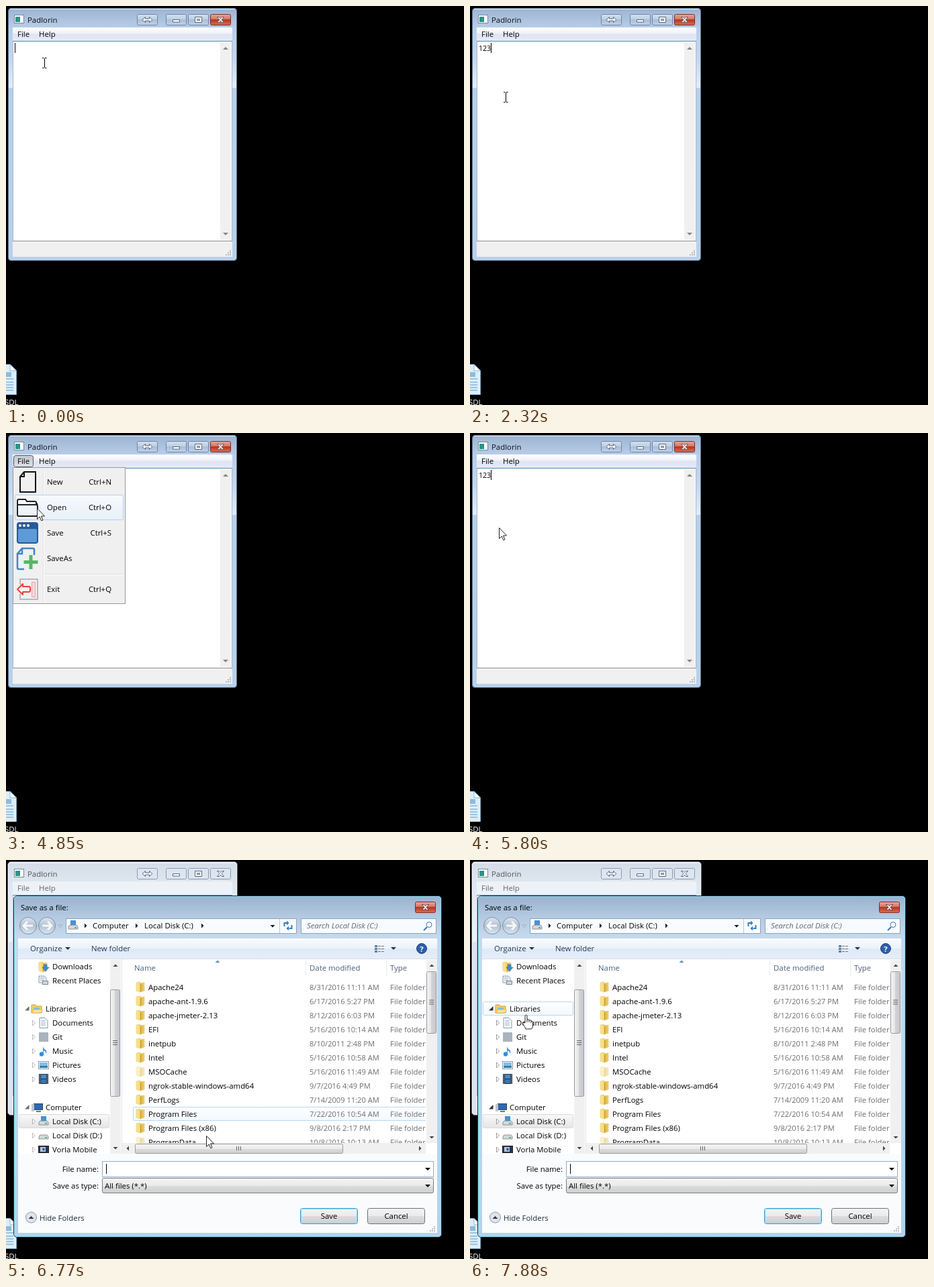
Animation of 682x595 px, one loop 8 s. Source, as an HTML page:

```html
<!DOCTYPE html>
<html lang="en">
<head>
<meta charset="utf-8">
<title>Saving a text file</title>
<style>
  html, body { margin: 0; height: 100%; overflow: hidden; background: #000; }
  svg { display: block; width: 100%; height: 100%; }
  text { font: 11.4px "Open Sans", "Noto Sans", sans-serif; white-space: pre; }
  .date { font-size: 11.1px; }
  .typed { font-size: 10.6px; }
  .hint { font-style: italic; }
  .bold { font-weight: 700; }
</style>
</head>
<body>
<svg id="stage" viewBox="0 0 682 595" xmlns="http://www.w3.org/2000/svg"></svg>
<script>
const LOOP = 8000;
const stage = document.getElementById('stage');

// Markup helpers
const rect = (x, y, w, h, fill, extra = '') =>
  `<rect x="${x}" y="${y}" width="${w}" height="${h}" fill="${fill}" ${extra}/>`;
const box = (x, y, w, h, fill, stroke, r = 0, extra = '') =>
  rect(x + .5, y + .5, w - 1, h - 1, fill, `stroke="${stroke}" rx="${r}" ${extra}`);
const path = (d, fill = 'none', stroke = 'none', w = 1, extra = '') =>
  `<path d="${d}" fill="${fill}" stroke="${stroke}" stroke-width="${w}" ${extra}/>`;
const circle = (x, y, r, fill, stroke = 'none') =>
  `<circle cx="${x}" cy="${y}" r="${r}" fill="${fill}" stroke="${stroke}"/>`;
const text = (x, y, s, fill = '#000', extra = '') =>
  `<text x="${x}" y="${y}" fill="${fill}" ${extra}>${s}</text>`;
const group = (id, body) => `<g id="${id}">${body}</g>`;
const at = (x, y, body, extra = '') => `<g transform="translate(${x} ${y})" ${extra}>${body}</g>`;
const down = (x, y, fill = '#000', s = 4) => path(`M${x - s} ${y}h${2 * s}l${-s} ${s}z`, fill);
const up = (x, y, fill = '#000', s = 4) => path(`M${x - s} ${y}h${2 * s}l${-s} ${-s}z`, fill);
const right = (x, y, fill = '#000', s = 4) => path(`M${x} ${y - s}v${2 * s}l${s} ${-s}z`, fill);
const left = (x, y, fill = '#000', s = 4) => path(`M${x} ${y - s}v${2 * s}l${-s} ${-s}z`, fill);
const grip = (x, y, fill) => [0, 1, 2].map(i => [...Array(3 - i).keys()].map(j =>
  rect(x - 3 * j, y - 3 * i, 2, 2, fill)).join('')).join('');

const gradient = (id, stops, across) =>
  `<linearGradient id="${id}" x2="${across ? 1 : 0}" y2="${across ? 0 : 1}">` +
  stops.map(([o, c]) => `<stop offset="${o}" stop-color="${c}"/>`).join('') + '</linearGradient>';

const defs = '<defs>' +
  gradient('frameOn', [[0, '#9db4d2'], [.08, '#b8cee8'], [.2, '#c3d8ee'], [.315, '#e2edf8'], [.316, '#b7d0ea'], [1, '#b9d1ea']]) +
  gradient('frameOff', [[0, '#d3dce7'], [.08, '#dee6ef'], [.315, '#edf2f8'], [.316, '#d7e4f2'], [1, '#d7e4f2']]) +
  gradient('menubar', [[0, '#fff'], [.45, '#eef1f8'], [.5, '#dfe4f0'], [1, '#e6eaf5']]) +
  gradient('glass', [[0, '#d4e1f0'], [.45, '#bccfe5'], [.5, '#a8bfda'], [1, '#bed2e8']]) +
  gradient('red', [[0, '#e9a99b'], [.45, '#d27663'], [.5, '#b9341d'], [1, '#d4705a']]) +
  gradient('pressed', [[0, '#c4c6cf'], [1, '#e0e1e8']]) +
  gradient('hot', [[0, '#f8fafd'], [1, '#e8f0f9']]) +
  gradient('row', [[0, '#fdfeff'], [1, '#f3f8fd']]) +
  gradient('picked', [[0, '#f9f9f9'], [1, '#e5e5e5']]) +
  gradient('button', [[0, '#f3f3f3'], [.5, '#ebebeb'], [.52, '#dcdcdc'], [1, '#cfcfcf']]) +
  gradient('thumbV', [[0, '#f4f4f4'], [.45, '#e6e6e8'], [.5, '#d2d3d6'], [1, '#c5c7ca']], true) +
  gradient('dialog', [[0, '#9ab2cf'], [.06, '#b3c9e1'], [.12, '#c6d9ec'], [.25, '#c3d9ee'], [1, '#b5d2ec']]) +
  gradient('toolbar', [[0, '#fafcff'], [.5, '#eaf2fb'], [.52, '#dfe9f6'], [1, '#e6eef8']]) +
  gradient('ball', [[0, '#dfe7ef'], [.5, '#b2c1d2'], [1, '#dce6f0']]) +
  gradient('folder', [[0, '#fbe9a0'], [.5, '#f3d468'], [.55, '#dcb23f'], [1, '#f0d272']], true) +
  '<clipPath id="list"><path d="M173 148h452v274H173z"/></clipPath>' +
  '<clipPath id="side"><path d="M18 148h137v290H18z"/></clipPath></defs>';

// Editor window
const closeMark = (x, y, line) =>
  path(`M${x} ${y}h3l2 2.200l2 -2.200h3l-3.500 4l3.500 4h-3l-2 -2.200l-2 2.200h-3l3.500 -4z`, '#fff', line);

function captionButtons(on) {
  const face = on ? 'url(#glass)' : '#dce6f1', edge = on ? '#6f86a3' : '#8d9cb0';
  const line = '#5b6677', sym = d => path(d, '#fff', line);
  return [195, 238, 271].map(x => box(x, 12, 31, 17, face, edge, 2)).join('') +
    box(304, 12, 31, 17, on ? 'url(#red)' : face, on ? '#76332a' : edge, 2) +
    sym('M203 20.500l4.500 -4v2.500h6v-2.500l4.500 4l-4.500 4v-2.500h-6v2.500z') +
    sym('M248.500 20.500h10v3.500h-10z') +
    sym('M281.500 16.500h10v8h-10zM284.500 19.500h4v2h-4z') + closeMark(314.5, 16.5, line);
}

function editorFrame(on) {
  const ink = on ? '#000' : '#666';
  const shell = on
    ? box(3, 3, 341, 377, 'url(#frameOn)', '#5d7590', 4)
    : box(2, 2, 343, 379, 'url(#frameOff)', '#545b63', 5) + box(3, 3, 341, 377, 'none', '#f1f5fa', 4);
  return shell + path('M6 4.500H341', 'none', '#e8f1fa') +
    box(12, 13, 15, 13, '#fff', '#7b8797') + rect(14, 16, 5, 8, '#239a84') + rect(19, 16, 2, 8, '#3b78c4') +
    text(32, 25, 'Padlorin', on ? '#111' : '#555') + captionButtons(on) +
    rect(10, 32, 327, 20, on ? 'url(#menubar)' : '#edf1f8') +
    (on ? group('fileHot', box(11, 33, 30, 18, '#e7eaf2', '#aeb5c4', 3)) +
          group('fileDown', box(11, 33, 30, 18, 'url(#pressed)', '#53565f', 3)) : '') +
    text(17, 46, 'File', ink) + text(49, 46, 'Help', ink);
}

const editorBody =
  box(10, 52, 327, 299, '#fff', '#a9b7c9') + rect(10, 52, 327, 1, '#4f8cb5') +
  rect(319, 54, 16, 295, '#f0f0f0') + up(327, 65, '#858585') + down(327, 338, '#858585') +
  rect(10, 350, 327, 24, '#f0f0f0') + rect(10, 350, 327, 1, '#8b8e93') + grip(333, 370, '#b9b9b9') +
  text(13, 67, '', '#000', 'id="typed" class="typed"') +
  rect(13, 55, 1, 15, '#000', 'id="caret"') +
  group('tip', text(14, 366, 'Save a file'));

// File menu
const menuItem = (y, name, keys) =>
  text(61, y, name) + text(157, y, keys, '#000', 'text-anchor="end"');
const menu = box(10, 51, 168, 204, '#f0f0f0', '#979797') +
  rect(55, 53, 1, 200, '#e0e0e0') + rect(56, 53, 1, 200, '#fff') +
  rect(57, 210, 119, 1, '#dcdcdc') + rect(57, 211, 119, 1, '#fff') +
  box(13, 54, 162, 38, 'url(#hot)', '#aecff0', 2, 'id="menuHot"') +
  path('M27 58H44V88H21V65zM27 58V65H21', 'none', '#111', 2) +
  path('M17 121V101q0 -2 2 -2h10l2 3h12q2 0 2 2v3M17 107h28q2 0 2 2v13q0 2 -2 2H19q-2 0 -2 -2zM45 104l2 3', 'none', '#222', 2) +
  rect(16, 133, 32, 32, '#285a98', 'rx="4"') + rect(18, 143, 28, 20, '#5e9ad5', 'rx="2"') +
  [21, 27, 33].map(x => circle(x, 138, 2, '#fff')).join('') +
  path('M27 203H19q-2 0 -2 -2V180l7 -8H40q2 0 2 2v8M24 172v8h-7', 'none', '#4284c8', 2.5) +
  path('M37 182v21M26.500 192.500h21', 'none', '#55b768', 5) +
  path('M21 226V218H47V248H21V240', 'none', '#b6bac0', 2) + box(38, 222, 6, 23, '#f5d9d9', '#eaa0a0') +
  path('M17 233l8 -8v4h9q2 0 2 2v4q0 2 -2 2h-9v4z', '#fff4f3', '#ee4035', 2, 'stroke-linejoin="round"') +
  menuItem(77, 'New', 'Ctrl+N') + menuItem(115, 'Open', 'Ctrl+O') + menuItem(153, 'Save', 'Ctrl+S') +
  menuItem(191, 'SaveAs', '') + menuItem(237, 'Exit', 'Ctrl+Q');

// Small icons, 16 px square
const folder = path('M1 2l6 -1v2l6 -1v12l-6 2l-6 -2z', 'url(#folder)', '#e3bf5c', .6) + path('M7.500 4v11', 'none', '#b98f2b', .8);
const drive = path('M1 9l2 -2h10l2 2v4H1z', '#d5d8db', '#767c83', .8) + rect(10, 10, 3, 1.5, '#41b14a');
const screen = box(1, 2, 14, 10, '#2c68b8', '#3d434b') + rect(5, 13, 7, 2, '#777');
const page = path('M2 .500h8l4 4v11H2z', '#fff', '#8796a8') + path('M4 5h7M4 8h7M4 11h7', 'none', '#7ba2cc');
const icons = {
  downloads: folder + path('M9 5h4v4h3l-5 6l-5 -6h3z', '#3790d8', '#1c63a8', .6),
  recent: path('M1 1h8l3 3v7H1z', '#eef2f6', '#8a97a6') + path('M3 4h6M3 7h6', 'none', '#9aaabc') + box(6, 8, 9, 6, '#cfd8e2', '#7b8896'),
  libraries: path('M0 2h6l1 2h8v10H0z', '#f2d06a', '#cfa23a') + rect(3, 6, 9, 5, '#7fc2e6') + path('M0 14l3 -5h13l-1 5z', '#f8e39a', '#d2a843', .7),
  document: page,
  plain: rect(1, 1, 14, 14, '#a9b3bf'),
  music: path('M7 12V1q1 4 5 6q1 3 -1 5q1 -4 -3 -5v6', '#2f8fe0') + circle(5, 12.5, 3.2, '#2f8fe0'),
  picture: box(0, 2, 16, 12, '#fff', '#8a96a4') + rect(2, 4, 12, 5, '#7dc0ec') + rect(2, 9, 12, 3, '#377f9d'),
  video: rect(1, 0, 14, 15, '#28323d') + rect(4, 1, 8, 6, '#438bc9') + rect(4, 8, 8, 6, '#3b76b0') + path('M2.500 1v14M13.500 1v14', 'none', '#ddd', 1, 'stroke-dasharray="1.500 1.500"'),
  computer: at(2, 0, screen) + rect(0, 3, 4, 11, '#c2c8cf'),
  system: drive + rect(4, 0, 8, 7, '#4a90d0'),
  drive,
  phone: box(0, 2, 16, 11, '#27364f', '#222') + rect(3, 4, 8, 7, '#b8c7dd') + circle(8, 7.5, 2, '#335f9f')
};

// Save dialog
const places = [
  [159, 'downloads', 'Downloads'], [180, 'recent', 'Recent Places'],
  [222, 'libraries', 'Libraries', 'open'], [243, 'document', 'Documents', 'shut'],
  [264, 'plain', 'Git', 'shut'], [285, 'music', 'Music', 'shut'],
  [306, 'picture', 'Pictures', 'shut'], [327, 'video', 'Videos', 'shut'],
  [369, 'computer', 'Computer', 'open'], [390, 'system', 'Local Disk (C:)', 'shut'],
  [411, 'drive', 'Local Disk (D:)', 'shut'], [432, 'phone', 'Vorla Mobile', 'shut']
];
const files = [
  ['Apache24', '8/31/2016 11:11 AM'], ['apache-ant-1.9.6', '6/17/2016 5:27 PM'],
  ['apache-jmeter-2.13', '8/12/2016 6:03 PM'], ['EFI', '5/16/2016 10:14 AM'],
  ['inetpub', '8/10/2011 2:48 PM'], ['Intel', '5/16/2016 10:58 AM'],
  ['MSOCache', '5/16/2016 11:49 AM', true], ['ngrok-stable-windows-amd64', '9/7/2016 4:49 PM'],
  ['PerfLogs', '7/14/2009 11:20 AM'], ['Program Files', '7/22/2016 10:54 AM'],
  ['Program Files (x86)', '9/8/2016 2:17 PM'], ['ProgramData', '10/8/2016 10:13 AM', true]
];

const placeRow = ([y, icon, name, state]) => {
  const indent = state === 'open' ? 0 : 10;
  return at(38 + indent, y - 8, icons[icon]) + text(59 + indent, y + 4, name);
};
const twisty = ([y, , , state]) => state === 'open'
  ? path(`M34.500 ${y - 4}v6.500h-6.500z`, '#333')
  : state ? path(`M39.500 ${y - 4}v8l4 -4z`, '#fff', '#999') : '';
const fileRow = ([name, date, dim], i) => {
  const y = 190 + 21 * i;
  return at(193, y - 9, folder, dim ? 'opacity=".45"' : '') + text(212, y + 4, name) +
    text(452, y + 4, date, '#6d6d6d', 'class="date"') + text(572, y + 4, 'File folder', '#6d6d6d');
};
const scrollV = (x, y, h, top, size) => rect(x, y, 16, h, '#f0f0f0') + up(x + 8, y + 10, '#444', 3.5) +
  down(x + 8, y + h - 10, '#444', 3.5) + box(x, top, 15, size, 'url(#thumbV)', '#989a9e', 2) +
  [-3, 0, 3].map(d => rect(x + 4, top + size / 2 + d - 1, 7, 1, '#5f6368')).join('');
const pushButton = (x, w, name, edge) => box(x, 519, w, 24, 'url(#button)', edge, 3) +
  text(x + w / 2, 535, name, '#000', 'text-anchor="middle"');

const addressBar =
  [33, 61].map(x => circle(x, 98, 12.5, 'url(#ball)', '#7d8fa5')).join('') +
  path('M40 98H27M32 92l-6 6l6 6M54 98h13M62 92l6 6l-6 6', 'none', '#f5f8fb', 3) +
  path('M78 97h6l-3 3.500z', '#d9e4ef', '#8a9db3', .8) +
  box(89, 87, 344, 23, '#f9fcff', '#8ba4be') + rect(407, 88, 1, 21, '#b9c9da') +
  at(92, 90, icons.system) + right(117, 98, '#111', 3.5) + text(129, 102, 'Computer') +
  right(193, 98, '#111', 3.5) + text(206, 102, 'Local Disk (C:)') +
  group('crumb', right(291, 98, '#111', 3.5)) + down(397, 97, '#111', 3.5) +
  path('M414.500 99v-5h4M425.500 97v5h-4', 'none', '#2f7fc6', 2) +
  left(421, 102, '#2f7fc6', 3.5) + right(418, 94, '#2f7fc6', 3.5) +
  box(439, 87, 202, 23, '#f7fbff', '#8ba4be') +
  text(448, 102, 'Search Local Disk (C:)', '#666', 'class="hint"') +
  circle(630, 96.5, 4, 'none', '#3a74b5') + path('M627 100l-5 5', 'none', '#3a74b5', 2);

const toolbar = rect(18, 117, 624, 30, 'url(#toolbar)') + rect(18, 147, 624, 1, '#d2dcea') +
  text(36, 136, 'Organize', '#1e395b') + down(92, 130, '#1e395b') + text(127, 136, 'New folder', '#1e395b') +
  [127, 131, 135].map(y => rect(549, y, 4, 3, '#5b7fae') + rect(554, y + 1, 4, 1, '#777') + rect(559, y + 1, 4, 1, '#777')).join('') +
  down(577, 130, '#1e395b') + circle(619, 132, 7.5, '#2f5fa9', '#1c3f7c') +
  text(619, 136.5, '?', '#fff', 'text-anchor="middle" class="bold"');

const sidebar = '<g clip-path="url(#side)">' +
  box(19, 379, 135, 21, 'url(#picked)', '#d9d9d9', 2) +
  box(19, 0, 135, 21, 'url(#row)', '#b8d8f2', 2, 'id="placeHot"') +
  places.map(placeRow).join('') + group('twisties', places.map(twisty).join('')) + '</g>' +
  scrollV(155, 149, 289, 193, 160) + rect(172, 148, 1, 290, '#dfe6ee');

const fileList = '<g clip-path="url(#list)">' +
  box(189, 0, 440, 21, 'url(#row)', '#b8d8f2', 2, 'id="fileRowHot"') + files.map(fileRow).join('') + '</g>' +
  text(191, 165, 'Name', '#4c607a') + text(452, 165, 'Date modified', '#4c607a') + text(572, 165, 'Type', '#4c607a') +
  rect(446, 149, 1, 24, '#e5ebf2') + rect(566, 149, 1, 24, '#e5ebf2') + up(315, 153, '#5c91b8', 3.5) +
  scrollV(626, 149, 273, 166, 93) +
  rect(173, 422, 452, 16, '#f0f0f0') + left(183, 430, '#444', 3.5) + right(615, 430, '#444', 3.5) +
  box(192, 423, 310, 15, 'url(#button)', '#989a9e', 2) +
  [343, 346, 349].map(x => rect(x, 427, 1, 6, '#5f6368')).join('');

const dialog = box(11, 53, 638, 510, 'url(#dialog)', '#1d2c3a', 5) +
  box(12, 54, 636, 508, 'none', '#8fdcf6', 4) + text(22, 75, 'Save as a file:') +
  box(609, 62, 31, 17, 'url(#red)', '#76332a', 2) + closeMark(619.5, 66.5, '#5b4a4d') +
  addressBar + rect(18, 117, 624, 439, '#fafbfd') + rect(18, 148, 624, 290, '#fff') +
  toolbar + sidebar + fileList +
  text(138, 465, 'File name:', '#000', 'text-anchor="end"') + text(138, 490, 'Save as type:', '#000', 'text-anchor="end"') +
  box(143, 449, 494, 24, '#fff', '#8faecb') + rect(149, 453, 1, 15, '#000') + down(628, 459) +
  box(143, 474, 494, 23, 'url(#button)', '#7b7b7b', 2) + text(147, 490, 'All files (*.*)') + down(628, 484) +
  circle(37.5, 533, 8, '#dde4ed', '#8a98a9') + up(37.5, 535, '#333') + text(50, 538, 'Hide Folders', '#1e2c3d') +
  pushButton(438, 86, 'Save', '#3c9fd0') + box(439, 520, 84, 22, 'none', '#8fd5f3', 2) +
  pushButton(538, 86, 'Cancel', '#707070') + grip(637, 552, '#b4c0cc');

const desktop = rect(0, 0, 682, 595, '#000') +
  path('M-6 534.500H6L15.500 544V579.500H-6z', '#dceefb', '#79a9cf') + path('M6 534.500V544h9.500z', '#fff', '#8bb4d4') +
  path('M0 556h11M0 561h11M0 565h11M0 569h11M0 573h11', 'none', '#5c9bcb') + rect(0, 546, 8, 7, '#8bbce0') +
  text(-2, 595, 'SDL', '#fff');

const cursors =
  group('beam', path('M-3 -7.500h2.500M1 -7.500h2.500M-3 7.500h2.500M1 7.500h2.500M.500 -7v14', 'none', '#000')) +
  group('arrow', path('M.500 .500V16.500L4.200 13L6.800 18.800L9 17.800L6.500 12H11.500z', '#fff', '#222')) +
  group('hand', path('M-2 12V2q0 -2 1.500 -2t1.500 2v5q2.500 -1 3 1q2.500 -1 3 1q2.500 0 2.500 2v5q0 3 -2 5H-1q-1 -3 -4 -7q-1.500 -2.500 1 -2.500z', '#fff', '#222') +
    path('M1 7v4M4 8v3M7 9v3', 'none', '#222'));

stage.innerHTML = defs + desktop + group('on', editorFrame(true)) + group('off', editorFrame(false)) +
  editorBody + group('menu', menu) + group('dialogBox', dialog) + cursors;

// Timelines: each entry holds from its time until the next
const pointer = [
  [0, 'beam', 57, 85], [1120, '', 0, 0], [2320, 'beam', 53, 136], [2440, 'beam', 17, 90],
  [2590, 'arrow', 18, 48], [2710, 'arrow', 25, 43], [2870, 'arrow', 26, 44], [2990, 'arrow', 27, 45],
  [3290, 'arrow', 28, 56], [3410, 'arrow', 33, 70], [3560, 'arrow', 42, 92], [3680, 'arrow', 44, 96],
  [3960, 'arrow', 45, 97], [4700, 'arrow', 47, 103], [4850, 'arrow', 46, 112], [4970, 'arrow', 45, 131],
  [5090, 'arrow', 44, 138], [5240, 'arrow', 43, 141], [5950, 'hand', 117, 173], [6080, 'hand', 134, 186],
  [6230, 'arrow', 170, 232], [6350, 'arrow', 212, 278], [6470, 'arrow', 248, 324], [6620, 'arrow', 280, 368],
  [6770, 'arrow', 298, 411], [6890, 'arrow', 294, 447], [7010, 'arrow', 278, 424], [7160, 'arrow', 252, 395],
  [7310, 'arrow', 212, 369], [7460, 'hand', 138, 324], [7610, 'hand', 102, 278], [7730, 'hand', 76, 203], [7880, 'hand', 84, 231]
];
const typing = [[0, ''], [1120, '1'], [1390, '12'], [1510, '123']];
const menuRow = [[0, -1], [3290, 0], [3680, 1], [4970, 2]];
const hotPlace = [[0, 0], [5950, 159], [6080, 180], [6230, 0], [7460, 327], [7610, 285], [7730, 222]];
const hotFile = [[0, -1], [6350, 4], [6470, 6], [6620, 8], [6770, 9], [6890, -1], [7160, 10], [7310, 9], [7460, -1]];
const fade = [[0, .1], [6080, .5], [6230, .9], [6350, 1], [6620, .85], [6770, .7], [6890, .55], [7010, .4],
  [7160, .25], [7310, .1], [7460, .4], [7610, .8], [7730, 1]];

const hold = (track, t) => track.findLast(step => step[0] <= t);
const el = id => document.getElementById(id);
const show = (id, on) => el(id).setAttribute('display', on ? 'inline' : 'none');
const place = (id, y, on) => { show(id, on); el(id).setAttribute('y', y + .5); };

function draw(t) {
  const saving = t >= 5950, menuOpen = t >= 2870 && t < 5800;
  show('on', !saving);
  show('off', saving);
  show('dialogBox', saving);
  show('menu', menuOpen);
  show('fileHot', t >= 2590 && t < 2870);
  show('fileDown', menuOpen);
  show('tip', t >= 4970 && t < 5800);
  show('crumb', t >= 6230);

  const typed = hold(typing, t)[1];
  el('typed').textContent = typed;
  el('caret').setAttribute('x', 13 + 6 * typed.length);

  const item = hold(menuRow, t)[1], side = hold(hotPlace, t)[1], file = hold(hotFile, t)[1];
  place('menuHot', 54 + 38 * item, item >= 0);
  place('placeHot', side - 11, side > 0);
  place('fileRowHot', 179 + 21 * file, file >= 0);
  el('twisties').setAttribute('opacity', hold(fade, t)[1]);

  const [, kind, x, y] = hold(pointer, t);
  for (const id of ['beam', 'arrow', 'hand']) show(id, id === kind);
  if (kind) el(kind).setAttribute('transform', `translate(${x} ${y})`);
}

function tick() {
  draw(performance.now() % LOOP);
  requestAnimationFrame(tick);
}
tick();
</script>
</body>
</html>
```
